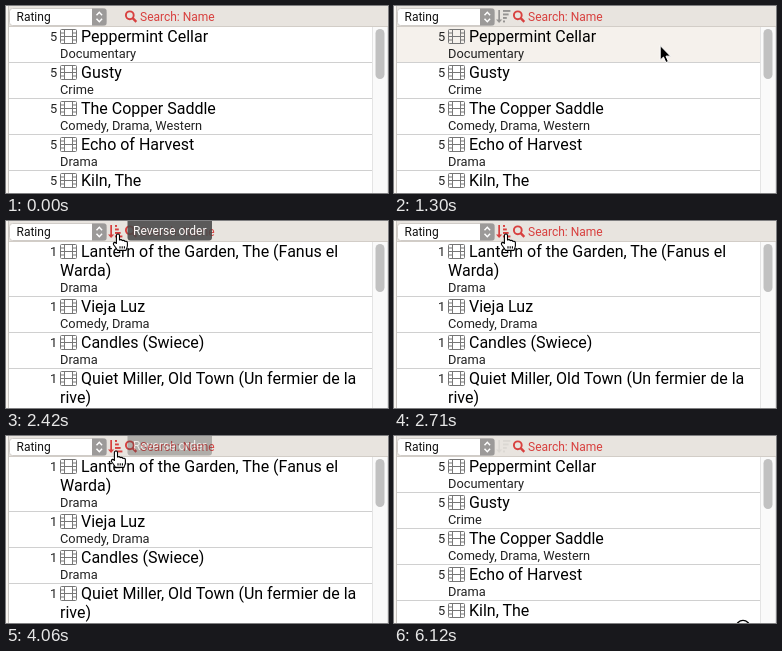
An HTML page that plays this animation: 382 by 187 pixels, repeating every 6.28 s.

```html
<!DOCTYPE html>
<html lang="en">
<head>
<meta charset="utf-8">
<title>Sorted movie list</title>
<style>
  html, body { margin: 0; width: 100%; height: 100%; overflow: hidden; background: #fff; }
  svg { display: block; width: 382px; height: 187px; font: 12px Roboto, Arial, sans-serif; }
  .title { font-size: 16px; fill: #000; }
  .small { font-size: 12.8px; fill: #222; }
</style>
</head>
<body>
<svg viewBox="0 0 382 187">
  <defs>
    <g id="film" fill="none" stroke="#777">
      <rect x=".5" y=".5" width="16" height="14" rx="1"/>
      <path d="M4.5 .5V14.5M12.5 .5V14.5M4.5 7.5H12.5M.5 4H4.5M.5 7.5H4.5M.5 11H4.5M12.5 4H16.5M12.5 7.5H16.5M12.5 11H16.5"/>
    </g>
  </defs>

  <rect width="382" height="187" fill="#fff"/>
  <g id="lists"></g>

  <rect x="366" y="20" width="16" height="167" fill="#fafafa"/>
  <path d="M366.5 20V187M381.5 20V187" stroke="#e4e4e4"/>
  <rect id="thumb" x="369.5" y="23" width="9" height="50" rx="4.5" fill="#c1c1c1"/>

  <rect width="382" height="20" fill="#e8e4df"/>
  <path d="M2 20.5H382" stroke="#d2cdc7"/>
  <rect width="2" height="187" fill="#f8f5f1"/>
  <path d="M2.5 0V187" stroke="#cbc7c2"/>

  <rect x="3.5" y="2.5" width="97" height="17" rx="3" fill="#fff" stroke="#d0ccc8"/>
  <path d="M86 2.5H98Q100.5 2.5 100.5 5V17Q100.5 19.5 98 19.5H86Z" fill="#9c9a99"/>
  <path d="M90.5 9.2L93.3 6.2L96.1 9.2M90.5 12.8L93.3 15.8L96.1 12.8" fill="none" stroke="#fff" stroke-width="1.4"/>
  <text x="10.5" y="15.2" fill="#111">Rating</text>

  <rect id="field" x="131.5" y="3.5" width="231" height="14" fill="#f2e9e5" stroke="#e0504f"/>
  <g fill="none" stroke="#d8403f">
    <circle cx="123.8" cy="9.3" r="3.9" stroke-width="1.9"/>
    <path d="M126.7 12.2L130.3 15.8" stroke-width="2.4"/>
  </g>
  <text x="134" y="15.2" fill="#d8403f">Search: Name</text>

  <g id="sort">
    <g id="grayIcon" fill="#969492"></g>
    <g id="redIcon" fill="#d8403f"></g>
  </g>

  <g id="tip">
    <rect x="121.5" y="-3" width="84.5" height="22.5" rx="3" fill="#484848"/>
    <text x="163.8" y="14" text-anchor="middle" fill="#fff">Reverse order</text>
  </g>

  <path id="arrow" d="M0 0V14.6L3.3 11.5L5.7 17L8.2 15.9L5.8 10.6H10.4Z" fill="#000" stroke="#fff"/>
  <path id="hand" fill="#fff" stroke="#000" stroke-width="1.1" stroke-linejoin="round"
    d="M-1.6 9.5V1.4Q-1.5 0 0 0T1.5 1.4V6Q3.3 5 4.4 6.6Q6.1 5.8 7 7.4Q9.4 6.8 9.4 9V12Q9 14 8 16.4H-.4Q-2 13.6-4.2 11Q-5.2 9-3.8 8.4Q-2.6 8.3-1.6 9.5ZM2 12.2V14.5M4.2 12.2V14.5M6.4 12.2V14.5"/>
  <circle id="ring" cx="349" cy="191.4" r="7" fill="#fff" stroke="#000" stroke-width="1.3"/>
</svg>
<script>
const LOOP = 6280;
const ENTER = 600, LEAVE = 5950;
const REVERSE = 2420, RESTORE = 4710;
const HOVER_FADE = 160;
const $ = id => document.getElementById(id);

const descending = [
  [5, ['Peppermint Cellar'], 'Documentary'],
  [5, ['Gusty'], 'Crime'],
  [5, ['The Copper Saddle'], 'Comedy, Drama, Western'],
  [5, ['Echo of Harvest'], 'Drama'],
  [5, ['Kiln, The'], 'Horror'],
];
const ascending = [
  [1, ['Lantern of the Garden, The (Fanus el', 'Warda)'], 'Drama'],
  [1, ['Vieja Luz'], 'Comedy, Drama'],
  [1, ['Candles (Swiece)'], 'Drama'],
  [1, ['Quiet Miller, Old Town (Un fermier de la', 'rive)'], 'Comedy'],
];

// The cursor rests between these eased moves.
const entry = { x: 400, y: 2 };
const moves = [
  { start: ENTER, end: 1070, x: 276, y: 40 },
  { start: 1240, end: 1530, x: 190, y: 36 },
  { start: 1530, end: 1700, x: 112, y: 13 },
  { start: 3480, end: 3660, x: 118, y: 40 },
  { start: 3830, end: 3940, x: 110, y: 15 },
  { start: 5430, end: LEAVE, x: 344, y: 190 },
];

const ramp = (t, start, end) => Math.min(1, Math.max(0, (t - start) / (end - start)));
const pulse = (t, inStart, inEnd, outStart, outEnd) =>
  ramp(t, inStart, inEnd) - ramp(t, outStart, outEnd);
const ease = k => k * k * (3 - 2 * k);

function cursorAt(t) {
  let { x, y } = entry;
  for (const move of moves) {
    const k = ease(ramp(t, move.start, move.end));
    x += (move.x - x) * k;
    y += (move.y - y) * k;
  }
  return { x, y };
}

function add(parent, tag, attrs, text = '') {
  const el = document.createElementNS('http://www.w3.org/2000/svg', tag);
  for (const name in attrs) el.setAttribute(name, attrs[name]);
  el.textContent = text;
  return parent.appendChild(el);
}

function buildList(movies) {
  const group = add($('lists'), 'g', {});
  const rows = [];
  let top = 21;
  for (const [rating, lines, genre] of movies) {
    const bottom = top + 17 + 19 * lines.length;
    const shade = add(group, 'rect', { x: 3, y: top, width: 363, height: bottom - top - 1, fill: '#f5f1ec' });
    add(group, 'text', { x: 44, y: top + 14.3, class: 'small' }, rating);
    add(group, 'use', { href: '#film', x: 54, y: top + 2 });
    lines.forEach((line, i) =>
      add(group, 'text', { x: i ? 54 : 75, y: top + 15.2 + 19 * i, class: 'title' }, line));
    add(group, 'text', { x: 54, y: bottom - 5, class: 'small' }, genre);
    add(group, 'path', { d: `M3 ${bottom - .5}H366`, stroke: '#d0d0d0' });
    rows.push({ shade, top, bottom });
    top = bottom;
  }
  return { group, rows };
}

function buildIcon(group) {
  add(group, 'path', { d: 'M104.3 4H106V13.4H108.2L105.1 17L102 13.4H104.3Z' });
  return [0, 1, 2, 3].map(i => add(group, 'rect', { x: 109, y: 4 + 3.5 * i, height: 1.9 }));
}

const lists = [buildList(descending), buildList(ascending)];
const icons = [buildIcon($('grayIcon')), buildIcon($('redIcon'))];

// Share of the recent cursor positions that lie on the row.
function hover(row, t) {
  const samples = 10;
  let hits = 0;
  for (let i = 0; i < samples; i++) {
    const { y } = cursorAt(t - i * HOVER_FADE / samples);
    if (y >= row.top && y < Math.min(row.bottom, 187)) hits++;
  }
  return hits / samples;
}

const show = (id, visible) => { $(id).style.display = visible ? '' : 'none'; };
const fade = (id, opacity) => $(id).setAttribute('opacity', opacity);

function render(t) {
  const reversed = t >= REVERSE && t < RESTORE;
  lists.forEach(({ group, rows }, i) => {
    group.style.display = reversed === (i === 1) ? '' : 'none';
    rows.forEach(row => row.shade.setAttribute('opacity', hover(row, t)));
  });
  $('thumb').setAttribute('height', reversed ? 48 : 50);
  for (const bars of icons) {
    bars.forEach((bar, i) => bar.setAttribute('width', 2 + 1.8 * (reversed ? i : 3 - i)));
  }

  const red = pulse(t, 1640, 1700, 3480, 3660) + pulse(t, 3860, 4000, 5430, 5600);
  fade('redIcon', red);
  fade('grayIcon', 1 - red);
  fade('sort', pulse(t, ENTER, 800, LEAVE, 6150));
  fade('field', pulse(t, ENTER, 700, 830, 1010));
  fade('tip', .88 * (pulse(t, 1690, 1880, 2540, 2710) + pulse(t, 3950, 4230, 4830, 4980)));

  const { x, y } = cursorAt(t);
  const overIcon = x < 119 && y < 20;
  for (const id of ['arrow', 'hand']) $(id).setAttribute('transform', `translate(${x} ${y})`);
  show('arrow', t >= ENTER && !overIcon);
  show('hand', overIcon);
  show('ring', t >= 6070);
}

const start = performance.now();
function frame() {
  render((performance.now() - start) % LOOP);
  requestAnimationFrame(frame);
}
frame();
</script>
</body>
</html>
```
